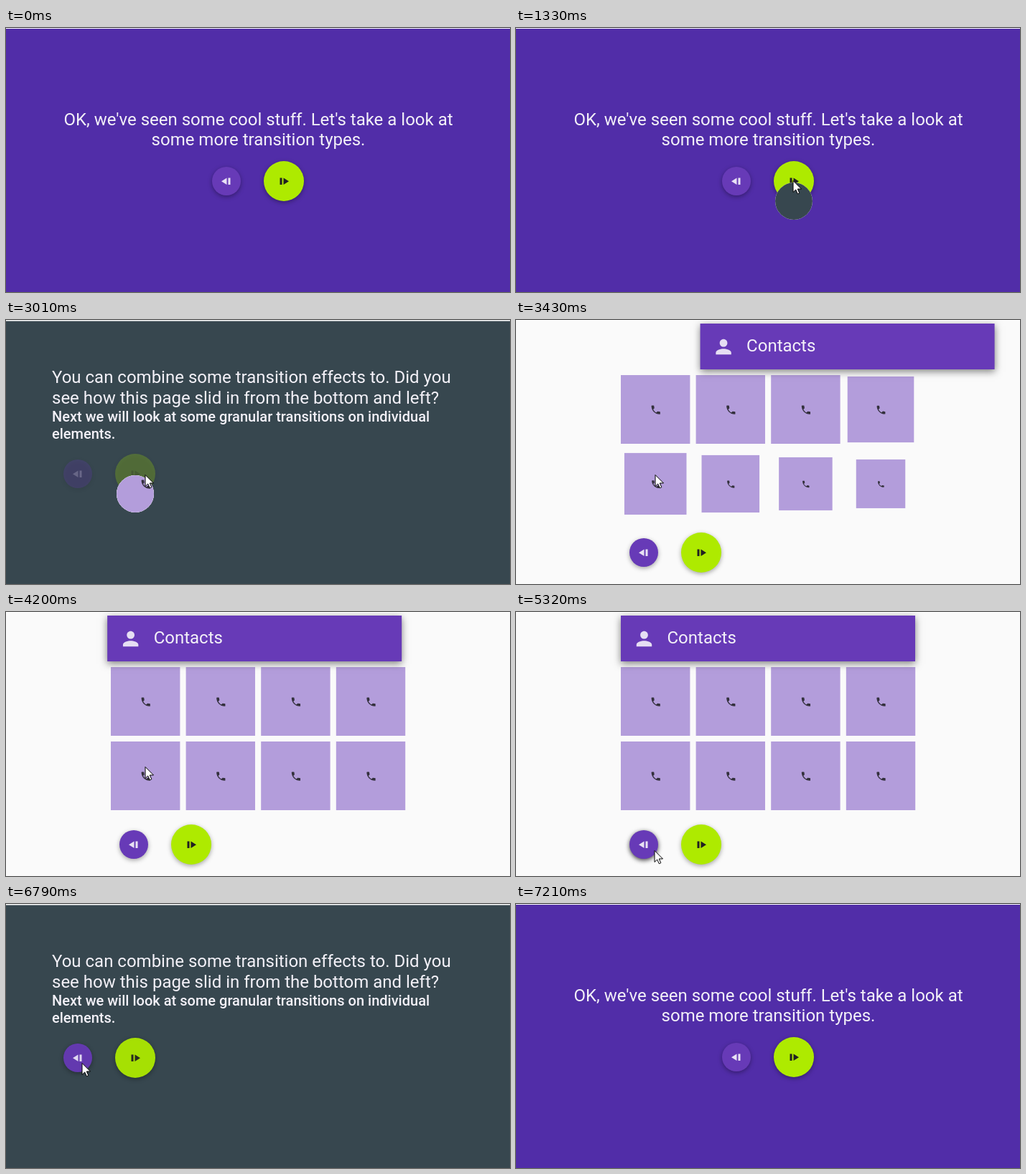
An HTML page with a canvas that plays this animation: 702 px wide and 369 px high, repeating every 8.19 s.

```html
<!DOCTYPE html>
<html lang="en">
<head>
<meta charset="utf-8">
<title>Page transitions</title>
<style>
  html, body { margin: 0; width: 100%; height: 100%; overflow: hidden; background: #fff; }
  canvas { display: block; }
</style>
</head>
<body>
<canvas id="stage" width="702" height="369"></canvas>
<script>
const W = 702, H = 369, LOOP = 8190;
const ctx = document.getElementById('stage').getContext('2d');
const FONT = 'Roboto, Arial, sans-serif';
const VIOLET = '#673ab7', LIME = '#aeea00', LILAC = '#b39ddb', INK = '#212121', PALE = '#f3f1f8';

const PERSON = new Path2D('M12 12c2.21 0 4-1.79 4-4s-1.79-4-4-4-4 1.79-4 4 1.79 4 4 4zm0 2c-2.67 0-8 1.34-8 4v2h16v-2c0-2.66-5.33-4-8-4z');
const PHONE = new Path2D('M6.62 10.79c1.44 2.83 3.76 5.14 6.59 6.59l2.2-2.2c.27-.27.67-.36 1.02-.24 1.12.37 2.33.57 3.57.57.55 0 1 .45 1 1V20c0 .55-.45 1-1 1-9.39 0-17-7.61-17-17 0-.55.45-1 1-1h3.5c.55 0 1 .45 1 1 0 1.25.2 2.45.57 3.57.11.35.03.74-.25 1.02l-2.2 2.2z');
const ARROW = new Path2D('M.5 .5V16.5L4.2 13 6.8 18.8 9.3 17.7 6.8 12H12z');

const clamp = (v) => Math.max(0, Math.min(1, v));
const mix = (a, b, k) => a + (b - a) * k;
const easeOut = (k) => 1 - (1 - k) ** 3;
const smooth = (k) => k * k * (3 - 2 * k);

// cubic-bezier(.4, 0, .2, 1)
function standard(k) {
  let lo = 0, hi = 1;
  for (let i = 0; i < 20; i++) {
    const u = (lo + hi) / 2, v = 1 - u;
    if (1.2 * v * v * u + 0.6 * v * u * u + u ** 3 < k) lo = u; else hi = u;
  }
  return smooth(lo);
}

function shadow(y, blur, alpha) {
  ctx.shadowColor = `rgba(0,0,0,${alpha})`;
  ctx.shadowOffsetY = y;
  ctx.shadowBlur = blur;
}

function text(str, x, y, size, weight = 400, align = 'left') {
  ctx.font = `${weight} ${size}px ${FONT}`;
  ctx.textAlign = align;
  ctx.fillStyle = PALE;
  ctx.fillText(str, x, y);
}

function icon(path, x, y, scale, color) {
  ctx.save();
  ctx.translate(x, y);
  ctx.scale(scale, scale);
  ctx.translate(-12, -12);
  ctx.fillStyle = color;
  ctx.fill(path);
  ctx.restore();
}

// dir is -1 for the back button and 1 for the forward button
function fab(x, y, r, fill, dir, color, depth = 0.35) {
  ctx.save();
  ctx.translate(x, y);
  ctx.save();
  shadow(2, 6, depth);
  ctx.fillStyle = fill;
  ctx.beginPath();
  ctx.arc(0, 0, r, 0, 7);
  ctx.fill();
  ctx.restore();
  ctx.scale(dir, 1);
  ctx.fillStyle = color;
  ctx.fillRect(-5.5, -4.5, 3, 9.5);
  ctx.beginPath();
  ctx.moveTo(-0.5, -4.5);
  ctx.lineTo(7, 0.25);
  ctx.lineTo(-0.5, 5);
  ctx.fill();
  ctx.restore();
}

function fabs(x, y, depth) {
  fab(x, y, 20, VIOLET, -1, '#e8e1f4', depth);
  fab(x + 80, y, 28, LIME, 1, INK);
}

function backdrop(color, top) {
  ctx.fillStyle = '#fff';
  ctx.fillRect(0, 0, W, H);
  ctx.fillStyle = color;
  ctx.fillRect(0, top, W, H);
}

function introPage() {
  backdrop('#512da8', 1);
  text("OK, we've seen some cool stuff. Let's take a look at", 351.5, 136, 24, 400, 'center');
  text('some more transition types.', 351.5, 164, 24, 400, 'center');
  fabs(307, 214);
}

// since: time from entering; until: time to leaving
function comboPage(since, until) {
  backdrop('#37474f', 1.5);
  ctx.save();
  ctx.translate(-W * (1 - standard(clamp((since - 10) / 660))),
                 H * (1 - standard(clamp((since - 150) / 660))));
  text('You can combine some transition effects to. Did you', 64, 88, 24);
  text('see how this page slid in from the bottom and left?', 64, 117, 24);
  text('Next we will look at some granular transitions on individual', 64, 142, 20, 500);
  text('elements.', 64, 166, 20, 500);
  ctx.globalAlpha = clamp((until + 50) / 200);
  if (ctx.globalAlpha > 0) fabs(100, 215);
  ctx.restore();
}

// Bounces in from the right
function headerShift(since) {
  const stops = [[0, 3000], [0.6, -25], [0.75, 10], [0.9, -5], [1, 0]];
  const k = clamp((since + 198) / 1600);
  const i = Math.max(1, stops.findIndex((s) => k <= s[0]));
  const [k0, x0] = stops[i - 1], [k1, x1] = stops[i];
  return mix(x0, x1, easeOut((k - k0) / (k1 - k0)));
}

function contactsPage(since, until) {
  backdrop('#fafafa', 1);
  for (let i = 0; i < 8; i++) {
    const scale = since < 35 ? 1 : clamp((since + 130 - i * 30) / 480);
    if (!scale) continue;
    ctx.save();
    ctx.translate(194.2 + (i % 4) * 104.6, 125 + (i >> 2) * 104);
    ctx.scale(scale, scale);
    ctx.fillStyle = LILAC;
    ctx.fillRect(-48.2, -48, 96.4, 96);
    icon(PHONE, 0.5, 0.7, 0.68, '#33303c');
    ctx.restore();
  }
  ctx.save();
  ctx.translate(headerShift(since), 0);
  ctx.save();
  shadow(3, 10, 0.5);
  ctx.fillStyle = VIOLET;
  ctx.fillRect(146, 5, 410, 64);
  ctx.restore();
  icon(PERSON, 178.5, 37.5, 1.34, '#e6def3');
  text('Contacts', 210.5, 44, 24);
  ctx.restore();
  fabs(178, 325, until < 150 ? 0.75 : 0.35);
}

// Each visit: start time, page and the centre of its circular reveal
const visits = [
  { at: -2000, page: introPage, x: 351, y: 185 },
  { at: 1330, page: comboPage, x: 387, y: 242 },
  { at: 3010, page: contactsPage, x: 180, y: 243 },
  { at: 5390, page: comboPage, x: 178, y: 345 },
  { at: 6930, page: introPage, x: 100, y: 235 },
];

function drawVisit(i, t) {
  const { at, page, x, y } = visits[i];
  const next = visits[i + 1];
  const since = t - at;
  ctx.save();
  ctx.beginPath();
  ctx.arc(x, y, 2.36 * (since + 10), 0, 7);
  ctx.clip();
  page(since, next ? next.at - t : 9999);
  ctx.restore();
}

const track = [
  [350, 648, 369], [1100, 386, 213], [2200, 386, 213], [2800, 194, 216],
  [4450, 194, 216], [4830, 193, 333], [6250, 193, 333], [6800, 106, 222],
  [7000, 106, 222], [7210, 134, 234],
];

function drawCursor(t) {
  const i = track.findIndex((p) => t < p[0]);
  if (i < 1) return;
  const [t0, x0, y0] = track[i - 1], [t1, x1, y1] = track[i];
  const k = smooth((t - t0) / (t1 - t0));
  ctx.save();
  ctx.translate(Math.round(mix(x0, x1, k)) - 0.5, Math.round(mix(y0, y1, k)));
  ctx.fillStyle = '#fff';
  ctx.strokeStyle = '#000';
  ctx.lineWidth = 1;
  ctx.fill(ARROW);
  ctx.stroke(ARROW);
  ctx.restore();
}

function draw() {
  const t = performance.now() % LOOP;
  const current = visits.filter((v) => t >= v.at).length - 1;
  if (current) drawVisit(current - 1, t);
  drawVisit(current, t);
  ctx.fillStyle = '#fff';
  ctx.fillRect(0, 0, W, 1);
  drawCursor(t);
  requestAnimationFrame(draw);
}
draw();
</script>
</body>
</html>
```
